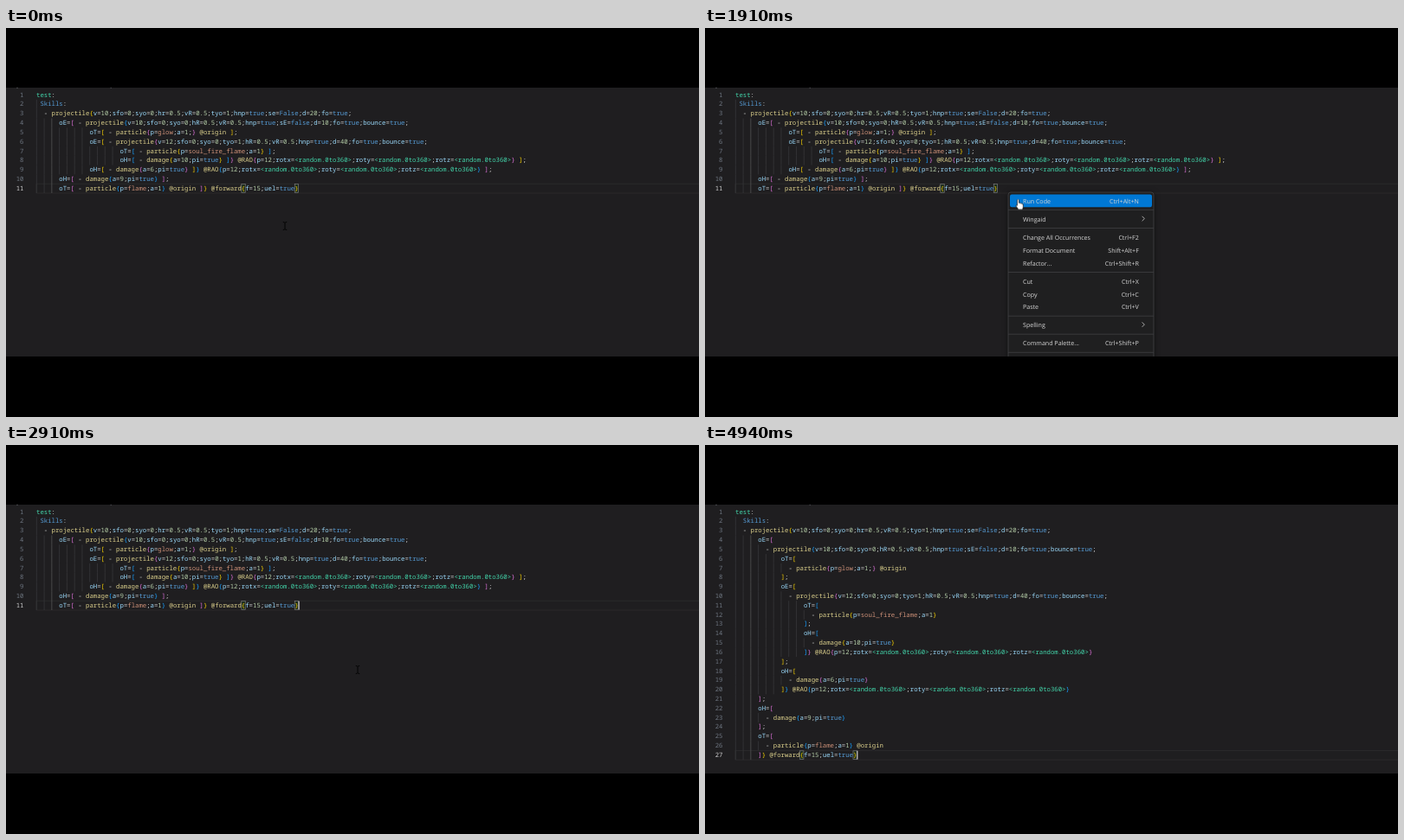
Recreate the animation shown at these times as an HTML page. Size 800 by 450 pixels, loop 4.97 s.

```html
<!DOCTYPE html>
<html lang="en">
<head>
<meta charset="utf-8">
<title>Format document</title>
<style>
  html, body { margin: 0; width: 100%; height: 100%; overflow: hidden; background: #000; }
  svg { display: block; width: 800px; height: 450px; }
  text { white-space: pre; text-rendering: geometricPrecision; }
  .code { font: 7.31px "Noto Sans Mono", monospace; }
  .menu text { font: 7.08px "Open Sans", "Noto Sans", sans-serif; fill: #d6d6d6; }
  .end { text-anchor: end; }

  .plain { fill: #d0d0d0; }
  .teal { fill: #43d6ab; }
  .blue { fill: #569cd6; }
  .string { fill: #ce9178; }
  .call { fill: #dcd08c; }
  .number { fill: #b5cea8; }
  .key { fill: #9cdcfe; }
  .depth0 { fill: #f5d000; }
  .depth1 { fill: #da70d6; }
  .depth2 { fill: #179fff; }
  .lineno { fill: #6e7681; }
  .lineno.current { fill: #d0d0d0; }
  .guide { stroke: #3c3c3e; stroke-width: .7; }
  .guide.active { stroke: #5c5c5e; }
  .current-row { fill: none; stroke: #2e2d2f; stroke-width: .8; }
  .match { fill: #1b2a1d; stroke: #8a8a8a; stroke-width: .6; }
  .caret { fill: #e0e0e0; }

  .before, .after, .menu, .hover, .beam, .hand, .before .matches, .caret {
    animation: 4970ms step-end infinite;
  }
  .before { animation-name: before; }
  .after { animation-name: after; }
  .menu, .hand { animation-name: menu; }
  .beam { animation-name: beam; }
  .hover { animation-name: hover; }
  .before .matches { animation-name: matches; }
  .before .caret { animation-name: caret-before; }
  .after .caret { animation-name: caret-after; }
  .pointer { animation: pointer 4970ms linear infinite; }

  @keyframes before { 0% { opacity: 1 } 59.1%, 100% { opacity: 0 } }
  @keyframes after { 0% { opacity: 0 } 59.1%, 100% { opacity: 1 } }
  @keyframes menu { 0% { opacity: 0 } 26.1% { opacity: 1 } 57.3%, 100% { opacity: 0 } }
  @keyframes beam { 0% { opacity: 1 } 26.1% { opacity: 0 } 57.3%, 100% { opacity: 1 } }
  @keyframes matches { 0% { opacity: 1 } 24.3% { opacity: 0 } 26.1%, 100% { opacity: 1 } }
  @keyframes caret-before { 0% { opacity: 0 } 57.3%, 100% { opacity: 1 } }
  @keyframes caret-after {
    0% { opacity: 1 } 68.8% { opacity: 0 } 79% { opacity: 1 }
    88.3% { opacity: 0 } 98.75%, 100% { opacity: 1 }
  }
  @keyframes hover {
    0% { transform: none }
    41.4% { transform: translateY(21px) }
    42.9% { transform: translateY(42.3px) }
    44.1%, 100% { transform: translateY(57px) }
  }
  @keyframes pointer {
    0%, 1.2% { transform: translate(322px, 229px); animation-timing-function: ease-in-out }
    11%, 25.1% { transform: translate(356px, 194px); animation-timing-function: ease-out }
    29.2%, 40.2% { transform: translate(364px, 205.5px); animation-timing-function: ease-in-out }
    46.3%, 70.8% { transform: translate(406px, 260px); animation-timing-function: ease-in }
    75.6% { transform: translate(480px, 239px) }
    78.7% { transform: translate(628px, 168px) }
    82.9% { transform: translate(790px, 105px) }
    83.5%, 100% { transform: translate(830px, 92px) }
  }
</style>
</head>
<body>
<svg viewBox="0 0 800 450">
  <rect y="69" width="800" height="311" fill="#1f1e20"/>
  <path d="M12 69.3h2M120.5 69.3h1.5" stroke="#55555a" stroke-width=".8"/>
  <g class="code before"></g>
  <g class="code after"></g>
  <g class="menu">
    <rect x="350" y="190" width="168" height="200" rx="3" fill="#1f1f20" stroke="#454547" stroke-width=".8"
          style="filter: drop-shadow(0 1px 3px #0008)"/>
    <rect class="hover" x="352" y="192.4" width="164" height="14.8" rx="2.2" fill="#0078d4"/>
  </g>
  <rect y="380" width="800" height="70"/>
  <g class="pointer">
    <path class="beam" d="M-2.2 -4.5Q-.2 -4.5 0 -3.6Q.2 -4.5 2.2 -4.5M0 -3.6V3.6M-2.2 4.5Q-.2 4.5 0 3.6Q.2 4.5 2.2 4.5"
          fill="none" stroke="#030303" stroke-width="1"/>
    <path class="hand" d="M-3.6 -6.6Q-2.6 -8.2 -1.6 -6.6V-3Q-.6 -3.8 .1 -2.7Q1.1 -3.3 1.7 -2.2Q3.2 -2.5 3.3 -1V1.6Q3.2 3.2 2.4 4.6H-2.3Q-3.2 2.6 -5 .6Q-5.4 -.9 -3.6 -.1Z"
          fill="#fff" stroke="#111" stroke-width=".7" stroke-linejoin="round"/>
  </g>
</svg>
<script>
const LEFT = 35, COLUMN = 4.386, BASELINE = 79.6, ROW = 10.82;
const columnX = column => LEFT + column * COLUMN;
const rowY = row => BASELINE + row * ROW;

const random = ["rotx", "roty", "rotz"].map(key => key + "=<random.0to360>").join(";");
const rao = `]} @RAO{p=12;${random}}`;
const outer = "- projectile{v=10;sfo=0;syo=0;hr=0.5;vR=0.5;tyo=1;hnp=true;se=False;d=20;fo=true;";
const middle = "- projectile{v=10;sfo=0;syo=0;hR=0.5;vR=0.5;hnp=true;sE=false;d=10;fo=true;bounce=true;";
const inner = "- projectile{v=12;sfo=0;syo=0;tyo=1;hR=0.5;vR=0.5;hnp=true;d=40;fo=true;bounce=true;";
const glow = "- particle{p=glow;a=1;} @origin";
const soul = "- particle{p=soul_fire_flame;a=1}";
const flame = "- particle{p=flame;a=1} @origin";
const damage = amount => `- damage{a=${amount};pi=true}`;
const forward = "]} @forward{f=15;uel=true}";

// Each line: indent, text
const compact = [
  [0, "test:"], [1, "Skills:"], [2, outer],
  [6, `oE=[ ${middle}`],
  [14, `oT=[ ${glow} ];`],
  [14, `oE=[ ${inner}`],
  [22, `oT=[ ${soul} ];`],
  [22, `oH=[ ${damage(10)} ${rao} ];`],
  [14, `oH=[ ${damage(6)} ${rao} ];`],
  [6, `oH=[ ${damage(9)} ];`],
  [6, `oT=[ ${flame} ${forward}`]
];
const block = (indent, key, body, close = "];") =>
  [[indent, key + "=["], [indent + 2, body], [indent, close]];
const formatted = [
  [0, "test:"], [2, "Skills:"], [2, outer],
  [6, "oE=["], [8, middle],
  ...block(12, "oT", glow),
  [12, "oE=["], [14, inner],
  ...block(18, "oT", soul),
  ...block(18, "oH", damage(10), rao),
  [12, "];"],
  ...block(12, "oH", damage(6), rao),
  [6, "];"],
  ...block(6, "oH", damage(9)),
  ...block(6, "oT", flame, forward)
];

const TOKENS = new RegExp([
  "(?<teal>^test|<.*?>)",
  "(?<blue>Skills|true|[Ff]alse)",
  "(?<string>(?<=p=)[a-z_]+)",
  "(?<call>@\\w+|projectile|particle|damage)",
  "(?<number>(?<==)[\\d.]+)",
  "(?<key>\\w+(?==))",
  "(?<bracket>[\\[\\]{}])",
  "(?<plain>\\S)"
].join("|"), "g");

function add(parent, tag, attributes, content = "") {
  const node = document.createElementNS("http://www.w3.org/2000/svg", tag);
  for (const name in attributes) node.setAttribute(name, attributes[name]);
  node.textContent = content;
  return parent.appendChild(node);
}

function drawCode(group, lines) {
  const last = lines.length - 1;
  const rowTop = row => rowY(row) - 7.6;
  add(group, "rect", { class: "current-row", x: LEFT, y: rowTop(last), width: 780, height: ROW });

  lines.forEach(([indent], row) => {
    for (let column = 0; column < indent; column += 2) {
      const active = column === 4 ? " active" : "";
      const x = columnX(column) + .3;
      add(group, "line", { class: "guide" + active, x1: x, x2: x, y1: rowTop(row), y2: rowTop(row + 1) });
    }
  });

  const [indent, text] = lines[last];
  const matches = add(group, "g", { class: "matches" });
  for (const index of [text.lastIndexOf("{"), text.length - 1])
    add(matches, "rect", {
      class: "match", x: columnX(indent + index), y: rowTop(last) + .5, width: COLUMN, height: ROW - 1
    });

  let depth = 0;
  lines.forEach(([indent, text], row) => {
    const y = rowY(row);
    add(group, "text", { class: "end lineno" + (row === last ? " current" : ""), x: 20.4, y }, row + 1);
    const line = add(group, "text", { y });
    for (const token of text.matchAll(TOKENS)) {
      let kind = Object.keys(token.groups).find(name => token.groups[name]);
      if (kind === "bracket") {
        const opening = "[{".includes(token[0]);
        kind = "depth" + (opening ? depth++ : --depth) % 3;
      }
      add(line, "tspan", { class: kind, x: columnX(indent + token.index) }, token[0]);
    }
  });

  add(group, "rect", {
    class: "caret", x: columnX(indent + text.length), y: rowTop(last) + .4, width: 1, height: ROW - .8
  });
}

function drawMenu(menu) {
  const items = [
    [200, "Run Code", "Ctrl+Alt+N"],
    [221, "Wingaid"],
    [242.3, "Change All Occurrences", "Ctrl+F2"],
    [257, "Format Document", "Shift+Alt+F"],
    [272, "Refactor...", "Ctrl+Shift+R"],
    [293, "Cut", "Ctrl+X"],
    [308, "Copy", "Ctrl+C"],
    [322.8, "Paste", "Ctrl+V"],
    [343.6, "Spelling"],
    [364.8, "Command Palette...", "Ctrl+Shift+P"]
  ];
  for (const [y, label, shortcut] of items) {
    add(menu, "text", { x: 367, y: y + 2.5 }, label);
    if (shortcut) add(menu, "text", { class: "end", x: 500.8, y: y + 2.5 }, shortcut);
    else add(menu, "path", {
      d: `M504.6 ${y - 3.2}l2.7 2.7l-2.7 2.7`, fill: "none", stroke: "#d0d0d0", "stroke-width": .8
    });
  }
  for (const y of [210.4, 231.5, 282.5, 333.2, 354.2, 375.3])
    add(menu, "line", { x1: 350, x2: 518, y1: y, y2: y, stroke: "#414143", "stroke-width": .8 });
}

drawCode(document.querySelector(".before"), compact);
drawCode(document.querySelector(".after"), formatted);
drawMenu(document.querySelector(".menu"));
</script>
</body>
</html>
```
